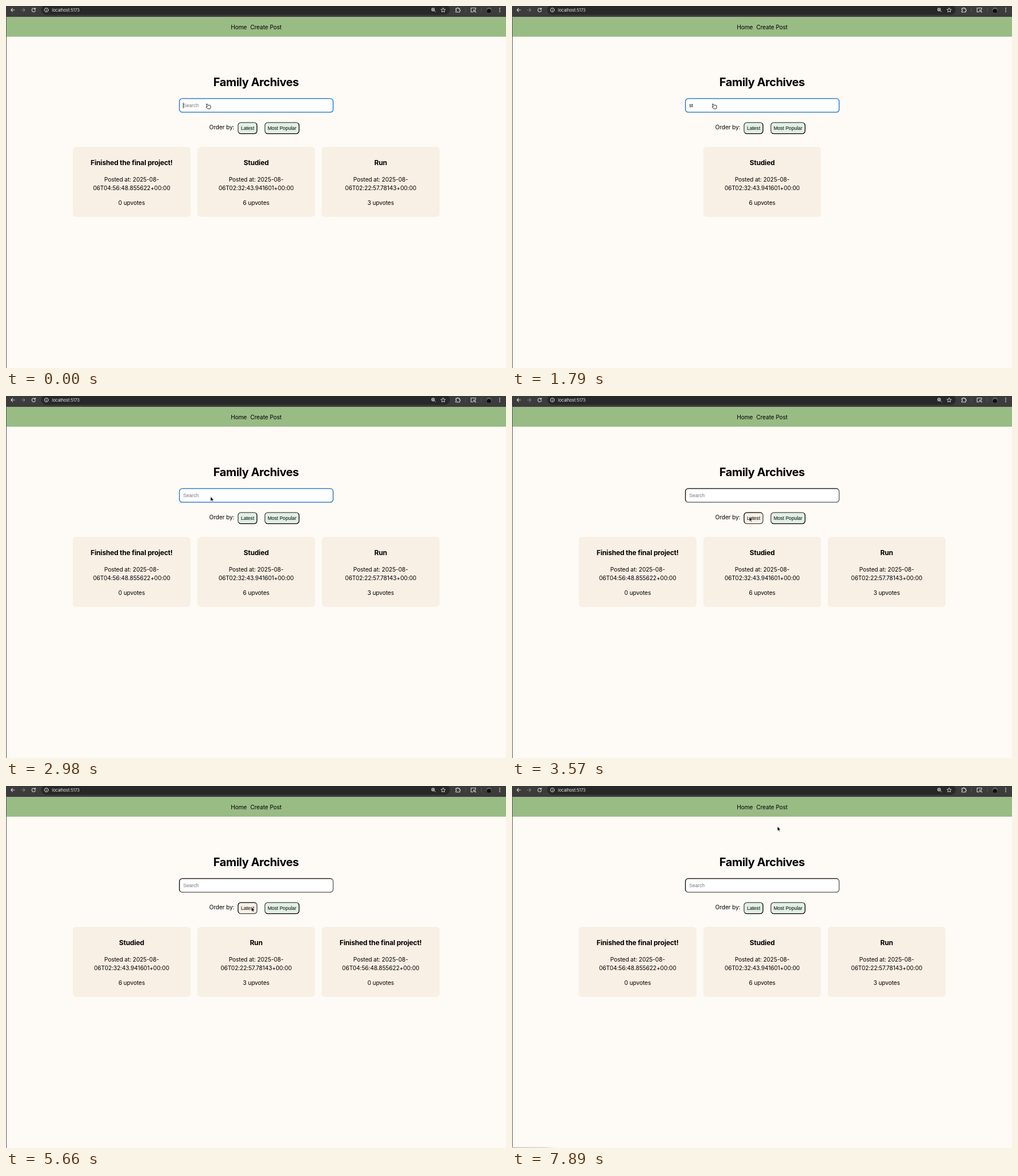
Recreate the animation shown at these times as an HTML page. Size 879x637 px, loop 8 s.

```html
<!DOCTYPE html>
<html lang="en">
<head>
<meta charset="utf-8">
<title>Family Archives</title>
<style>
html, body { margin: 0; width: 100%; height: 100%; overflow: hidden; background: #fefbf6; }
svg { display: block; width: 100vw; height: 100vh; }
text { font: 10.2px Inter, sans-serif; letter-spacing: -.1px; white-space: pre; }
.mid { text-anchor: middle; }
.h1 { font-size: 20.2px; font-weight: 700; letter-spacing: -.5px; }
.h3 { font-size: 12px; font-weight: 700; letter-spacing: -.17px; }
.ui { font: 8.6px "Liberation Sans", Arial, sans-serif; letter-spacing: 0; }
.url { font-size: 7.4px; fill: #e8e8e8; }
.icon { fill: none; stroke: #d6d6d6; stroke-width: 1.1; stroke-linecap: round; stroke-linejoin: round; }
.edge { fill: none; stroke-width: 1.3; }
</style>
</head>
<body>
<svg viewBox="0 0 879 637" preserveAspectRatio="none">
  <defs>
    <linearGradient id="fade">
      <stop offset="0" stop-color="#c9c7c4"/>
      <stop offset=".8" stop-color="#dddad6"/>
      <stop offset="1" stop-color="#fefbf6"/>
    </linearGradient>
  </defs>
  <rect width="879" height="637" fill="#fefbf6"/>

  <g id="toolbar">
    <rect width="879" height="19.5" fill="#3c3c3c"/>
    <rect x="62" y="-2" width="718" height="17.5" rx="8.5" fill="#282828"/>
    <g class="icon">
      <path d="M15 7H9M11.6 4.2L8.8 7l2.8 2.8"/>
      <path d="M27 7h6M30.4 4.2L33.2 7l-2.8 2.8" stroke="#7c7c7c"/>
      <path d="M51 5.2A3.1 3.1 0 1 0 51.6 7.8M51.6 3.6v2.2h-2.2"/>
      <circle cx="71" cy="7" r="3.5" stroke-width="1"/>
      <path d="M71 6.8v2M71 5.1v.1" stroke-width="1"/>
      <circle cx="750.8" cy="6.2" r="2.4"/>
      <path d="M752.7 8.1l2.4 2.4M749.8 6.2h2M750.8 5.2v2" stroke-width=".9"/>
      <path d="M768.5 3.3l1.2 2.5 2.7.3-2 1.9.5 2.7-2.4-1.3-2.4 1.3.5-2.7-2-1.9 2.7-.3z" stroke-width="1"/>
      <path d="M790.8 4.4h2a1.3 1.3 0 0 1 2.6 0h2v2a1.3 1.3 0 0 1 0 2.6v1.8h-6.6V8.9a1.3 1.3 0 0 0 0-2.5z"/>
      <path d="M821 10.5h-3.4v-7h8v2.8"/>
      <circle cx="823.3" cy="8.3" r="1.5"/>
      <path d="M824.5 9.5l1.5 1.5"/>
      <path d="M808 3.5v7M835.7 3.5v7" stroke="#5c5c5c" stroke-width=".8"/>
    </g>
    <circle cx="849" cy="7.5" r="4.8" fill="#666"/>
    <path d="M845.3 10.8V6.5q3.7-3 7.4 0v4.3q-3.7 2.6-7.4 0z" fill="#0c0c0c"/>
    <g fill="#d6d6d6">
      <circle cx="868" cy="4" r=".9"/><circle cx="868" cy="7" r=".9"/><circle cx="868" cy="10" r=".9"/>
    </g>
    <text class="url" x="81" y="9.7">localhost:5173</text>
  </g>

  <rect y="19.5" width="879" height="34.5" fill="#99bc85"/>
  <rect y="19.5" width="1" height="617.5" fill="#555"/>
  <text class="mid" x="409.4" y="40.7">Home</text>
  <text class="mid" x="457" y="40.7">Create Post</text>

  <text class="h1 mid" x="439.5" y="141.3">Family Archives</text>
  <g id="field"></g>
  <text id="query" class="ui" x="311.5" y="178"></text>
  <rect id="caret" y="170" width=".8" height="10"/>
  <text x="357.3" y="217.2">Order by:</text>
  <g id="buttons"></g>
  <g id="cards"></g>
  <rect id="status" y="635.4" width="76" height="1.6" fill="url(#fade)"/>

  <path id="hand" fill="#fff" stroke="#111" stroke-width=".9" stroke-linejoin="round"
    d="M352.2 172.6q1-.8 1.8.2l1.3 2 3-.3q1.2 0 1.4 1.2l.2 2.6-1 2.5-4 .2-3-2.7q-.3-1.2 1-1.1l.9.4z"/>
  <path id="arrow" stroke="#fff" stroke-width=".7" stroke-linejoin="round"
    d="M0 0V8.1L1.9 6.4 3.2 9.3 4.5 8.7 3.3 5.9H5.8Z"/>
</svg>

<script>
const LOOP = 8000, STEP = 145;
const $ = id => document.getElementById(id);

const posts = [
  { title: "Finished the final project!", time: "06T04:56:48.855622+00:00", votes: 0 },
  { title: "Studied", time: "06T02:32:43.941601+00:00", votes: 6 },
  { title: "Run", time: "06T02:22:57.78143+00:00", votes: 3 }
];
const popular = [...posts].sort((a, b) => b.votes - a.votes);

// [start, query, caret shown]
const typing = [
  [0, "", 1], [150, "", 0], [600, "s", 1], [900, "st", 1], [1050, "stu", 1],
  [1500, "stu", 0], [1790, "st", 0], [1940, "s", 0], [2090, "", 1],
  [2530, "", 0], [2990, "", 1], [3570, "", 0]
];
const blurAt = 3570, popularAt = 4770, latestAt = 5810, statusAt = 7600;

// Pointer moves: start, number of steps, end point
const moves = [
  { at: 2840, steps: 5, x: 417, y: 212.5 },
  { at: 4170, steps: 4, x: 468, y: 214.5 },
  { at: 5210, steps: 4, x: 431.5, y: 213 },
  { at: 6260, steps: 6, x: 230, y: 279 },
  { at: 7310, steps: 5, x: 466.5, y: 71 }
];

const buttons = [
  { label: "Latest", x: 408, y: 205.1, w: 33.2, h: 19.6 },
  { label: "Most Popular", x: 455.2, y: 205.1, w: 60, h: 19.6 }
];

// Rounded box whose top-left and bottom-right edges differ in colour
function bevelBox({ x, y, w, h }, fill, light, dark) {
  const r = 5, c = r * .293, arc = `A${r} ${r} 0 0 1 `;
  const right = x + w, low = y + h;
  const start = `${x + c} ${low - c}`, turn = `${right - c} ${y + c}`;
  return `<rect x="${x}" y="${y}" width="${w}" height="${h}" rx="${r}" fill="${fill}"/>
    <path class="edge" stroke="${light}" d="M${start}${arc}${x} ${low - r}V${y + r}${arc}${x + r} ${y}H${right - r}${arc}${turn}"/>
    <path class="edge" stroke="${dark}" d="M${turn}${arc}${right} ${y + r}V${low - r}${arc}${right - r} ${low}H${x + r}${arc}${start}"/>`;
}

function card(post, i, list) {
  const cx = 439.8 + (i - (list.length - 1) / 2) * 218.9;
  const line = (y, s, cls = "") => `<text class="mid ${cls}" x="${cx}" y="${y}">${s}</text>`;
  return `<rect x="${cx - 102.9}" y="248.5" width="205.8" height="122" rx="5" fill="#f9f0e5" stroke="#f3ede1" stroke-width=".8"/>`
    + line(280.4, post.title, "h3") + line(309, "Posted at: 2025-08-")
    + line(324.4, post.time) + line(350, `${post.votes} upvotes`);
}

function button(b, { x, y }) {
  const over = x > b.x && x < b.x + b.w && y > b.y && y < b.y + b.h;
  const box = over ? bevelBox(b, "#f9f0e5", "#000", "#444") : bevelBox(b, "#e1f0e4", "#444", "#000");
  return box + `<text class="ui mid" x="${b.x + b.w / 2}" y="217.8">${b.label}</text>`;
}

function pointer(t) {
  let pos = { x: 353, y: 173 };
  for (const m of moves) {
    if (t < m.at) break;
    const k = Math.min(1, (Math.floor((t - m.at) / STEP) + 1) / m.steps);
    const e = k * k * (3 - 2 * k);
    pos = { x: pos.x + (m.x - pos.x) * e, y: pos.y + (m.y - pos.y) * e };
  }
  return pos;
}

const drawn = {};
function fill(id, html) {
  if (drawn[id] !== html) $(id).innerHTML = drawn[id] = html;
}
const show = (id, on) => $(id).setAttribute("visibility", on ? "visible" : "hidden");

function render(t) {
  const [, query, caret] = typing.findLast(s => t >= s[0]);
  const focused = t < blurAt;
  const blue = "#1068cc";
  fill("field", bevelBox({ x: 304.9, y: 162.9, w: 270.2, h: 24 }, "#fff",
    focused ? blue : "#000", focused ? blue : "#555"));

  fill("query", query || "Search");
  $("query").setAttribute("fill", query ? "#000" : "#757575");
  const typed = query ? $("query").getComputedTextLength() : 0;
  $("caret").setAttribute("x", 311.3 + typed);
  show("caret", caret);

  const order = t >= popularAt && t < latestAt ? popular : posts;
  const found = order.filter(p => p.title.toLowerCase().includes(query));
  fill("cards", found.map(card).join(""));

  const pos = pointer(t), moved = t >= moves[0].at;
  fill("buttons", buttons.map(b => button(b, pos)).join(""));
  show("hand", !moved);
  show("arrow", moved);
  $("arrow").setAttribute("transform", `translate(${pos.x} ${pos.y})`);
  show("status", t >= statusAt);
}

const begin = performance.now();
function tick() {
  render((performance.now() - begin) % LOOP);
  requestAnimationFrame(tick);
}
tick();
</script>
</body>
</html>
```
